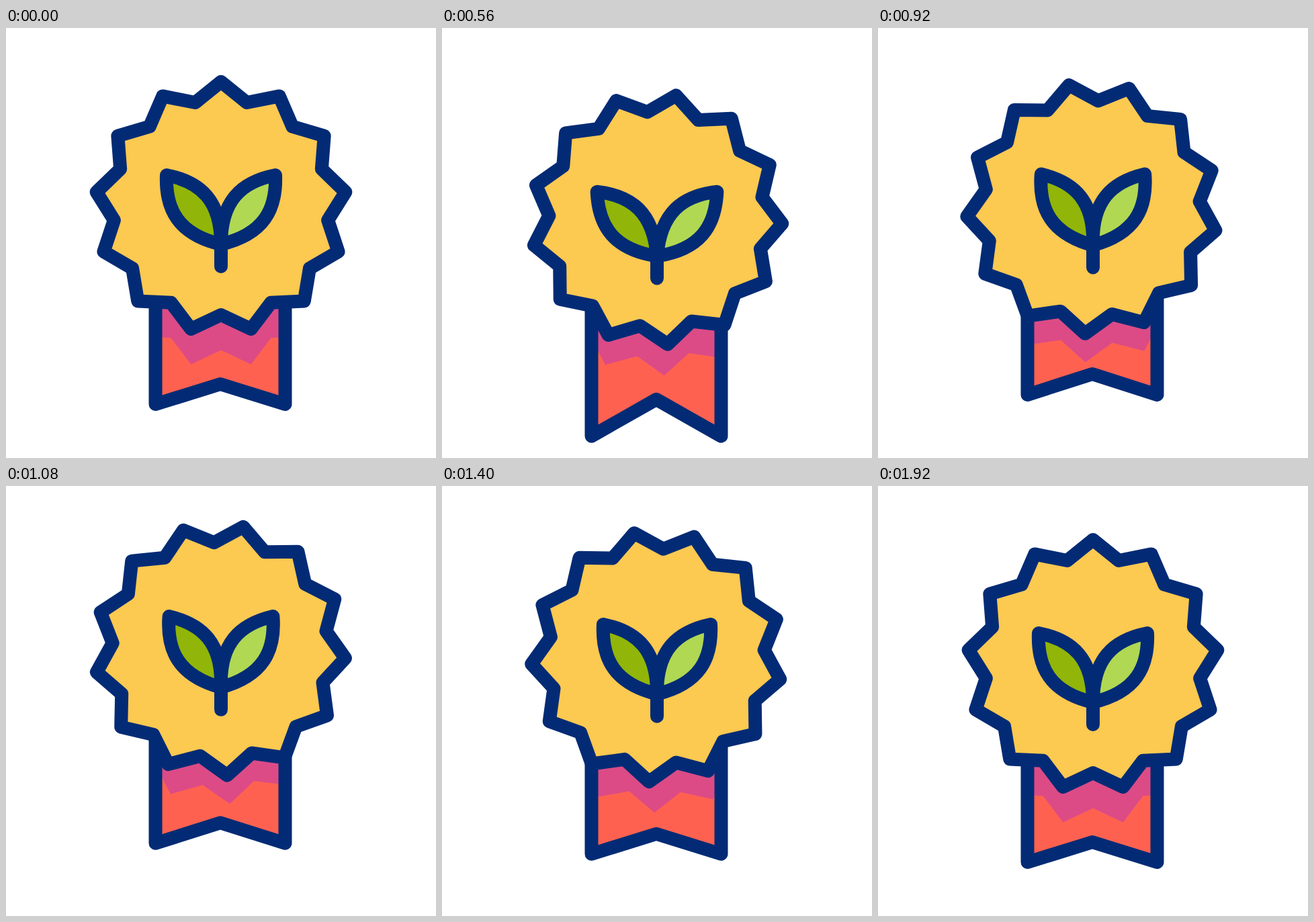
An HTML page for the animation above (2 s loop, 640 by 640 pixels).

```html
<!DOCTYPE html>
<html lang="en">
<head>
<meta charset="utf-8">
<title>Eco award badge</title>
<style>
  html, body { margin: 0; width: 100%; height: 100%; overflow: hidden; background: #fff; }
  svg { display: block; width: 100%; height: 100%; }
  .line { stroke: #032b75; stroke-width: 20; stroke-linecap: round; stroke-linejoin: round; }
</style>
</head>
<body>
<svg viewBox="0 0 640 640">
  <defs>
    <clipPath id="ribbonClip"><path id="clipShape"/></clipPath>
    <path id="leaf" d="M239 219C290 229 320 257 320 322C257 307 237 271 239 219Z"/>
  </defs>
  <path id="ribbon" fill="#ff6150"/>
  <g clip-path="url(#ribbonClip)"><path id="shadow" fill="#dc4b86"/></g>
  <path id="ribbonLine" class="line" fill="none"/>
  <path id="star" class="line" fill="#fcc951"/>
  <g id="sprout" class="line">
    <use id="leftLeaf" href="#leaf" fill="#91b508"/>
    <use id="rightLeaf" href="#leaf" fill="#b0d853"/>
    <path d="M320 300V355" fill="none"/>
  </g>
</svg>
<script>
const LOOP = 2000, STEP = 40, START = 120, END = 1880;
const CX = 320, CY = 266.7, POINTS = 13, OUTER = 186.7, INNER = 160.3;
const PIVOT_OFFSET = 0.7;
const el = id => document.getElementById(id);
const radians = degrees => degrees * Math.PI / 180;

const progress = (t, from, to) => Math.min(1, Math.max(0, (t - from) / (to - from)));
const ease = (t, from, to) => {
  const p = progress(t, from, to);
  return p * p * (3 - 2 * p);
};
const easeOut = (t, from, to) => 1 - (1 - progress(t, from, to)) ** 3;

// The badge sinks, springs up, then settles.
const lift = t => 20.5 * ease(t, START, 700) - 52 * ease(t, 715, 1215)
  + 31.5 * easeOut(t, 1215, 1900);

// One full turn with a small extra push early on.
const spin = t => 360 * ease(t, START, END) + 8 * (ease(t, 320, 560) - ease(t, 560, 880));

// The ribbon lengthens by peak, recoils by dip, then relaxes.
const stretch = (t, peak, dip) => peak * ease(t, START, 680)
  - (peak + dip) * ease(t, 680, 920) + dip * ease(t, 920, 1200);

const leafTilt = t => 4.8 * ease(t, START, 480) - 6.9 * ease(t, 640, 920)
  + 2.1 * ease(t, 1000, 1600);

function starPath(cy, degrees) {
  const turn = radians(degrees);
  const x0 = CX - PIVOT_OFFSET * (1 - Math.cos(turn));
  const y0 = cy + PIVOT_OFFSET * Math.sin(turn);
  const corners = Array.from({ length: POINTS * 2 }, (_, i) => {
    const angle = i * Math.PI / POINTS + turn;
    const r = i % 2 ? INNER : OUTER;
    return `${(x0 + r * Math.sin(angle)).toFixed(2)} ${(y0 - r * Math.cos(angle)).toFixed(2)}`;
  });
  return `M${corners.join("L")}Z`;
}

function render(t) {
  const dy = lift(t), turn = spin(t), tilt = leafTilt(t);
  const top = 350 + dy;
  const corner = 560 + dy + stretch(t, 34, 15.5);
  const notch = 530 + dy + stretch(t, 6, 16.5);
  const ribbon = `M222.5 ${top}V${corner}L319 ${notch}L415.5 ${corner}V${top}Z`;

  // The shadow drifts closer and lags behind the star mid-turn.
  const phase = Math.PI * progress(t, START, END);
  const hump = Math.max(0, Math.sin(phase)) ** 1.3;
  const shadowTurn = 2 * Math.sin(2 * phase) - 0.7 * hump;

  for (const id of ["ribbon", "clipShape", "ribbonLine"]) el(id).setAttribute("d", ribbon);
  el("star").setAttribute("d", starPath(CY + dy, turn));
  el("shadow").setAttribute("d", starPath(CY + dy + 52.5 - 10 * hump, turn + shadowTurn));
  el("sprout").setAttribute("transform", `translate(0 ${dy})`);
  el("leftLeaf").setAttribute("transform", `rotate(${-tilt} 320 322)`);
  el("rightLeaf").setAttribute("transform", `translate(640 0) scale(-1 1) rotate(${-tilt} 320 322)`);
}

function tick() {
  render(Math.floor(performance.now() % LOOP / STEP) * STEP);
  requestAnimationFrame(tick);
}
tick();
</script>
</body>
</html>
```
